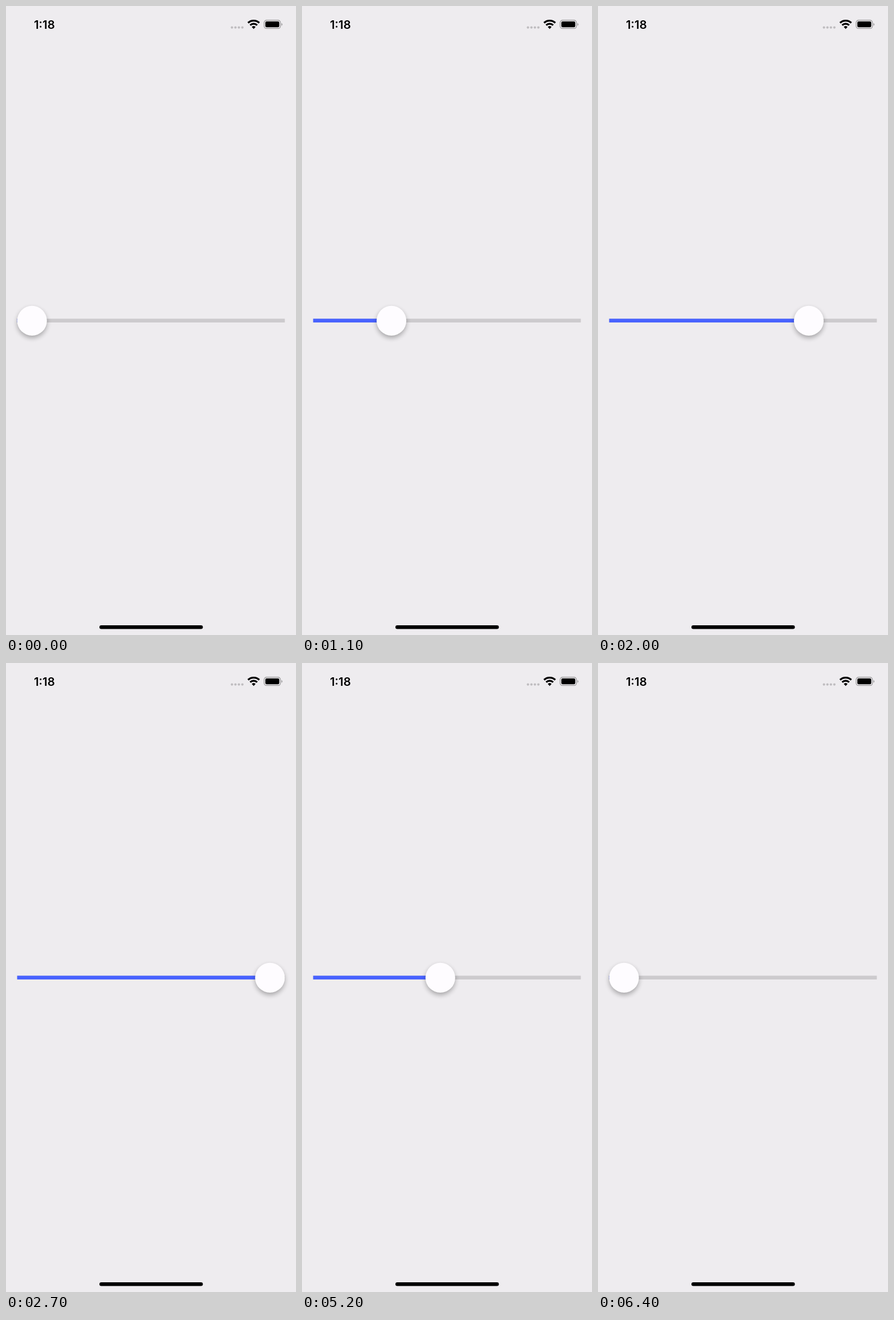
These frames come from a looping animation (509x1101 px, 6.6 s). An HTML page:

```html
<!DOCTYPE html>
<html lang="en">
<head>
<meta charset="utf-8">
<title>Slider</title>
<style>
  html, body { margin: 0; width: 100%; height: 100%; overflow: hidden; background: #eeecef; }
  svg { display: block; }
</style>
</head>
<body>
<svg width="509" height="1101" viewBox="0 0 509 1101">
  <defs>
    <filter id="blur" x="-50%" y="-50%" width="200%" height="200%">
      <feGaussianBlur stdDeviation="4.5"/>
    </filter>
  </defs>
  <rect width="509" height="1101" fill="#eeecef"/>

  <text x="67.4" y="39.8" text-anchor="middle" font-family="Inter, Roboto, sans-serif"
        font-size="20.4" font-weight="600">1:18</text>

  <g fill="#bfbdc0">
    <circle cx="396.6" cy="37.6" r="2.1"/>
    <circle cx="402.7" cy="37.6" r="2.1"/>
    <circle cx="408.8" cy="37.6" r="2.1"/>
    <circle cx="414.9" cy="37.6" r="2.1"/>
  </g>

  <g id="wifi" fill="none" stroke="#000" stroke-width="3.3"></g>

  <rect x="453.1" y="25" width="28.6" height="14.4" rx="4.2" fill="none" stroke="#9a999b" stroke-width="1.3"/>
  <rect x="455.2" y="27.1" width="24.4" height="10.2" rx="2.3"/>
  <path d="M483.5 29.8 a2.6 2.6 0 0 1 0 4.8 z" fill="#9a999b"/>

  <rect x="19.6" y="547.4" width="469.8" height="6.5" fill="#cccacd"/>
  <rect id="fill" x="19.6" y="547.4" height="6.5" fill="#4862ff"/>
  <g id="thumb">
    <circle cy="4" r="26" opacity=".3" filter="url(#blur)"/>
    <circle r="26.1" fill="#fefcff"/>
  </g>

  <rect x="164" y="1084" width="181.5" height="6.6" rx="3.3"/>
</svg>
<script>
const LOOP = 6600, STEP = 100, LEFT = 19.6, MIN = 45.7, MAX = 463.3;
const get = id => document.getElementById(id);

// Drag paths: [time in ms, thumb centre]
const forward = [[300, MIN], [400, 48], [1000, 122], [1100, 157], [1700, 317],
                 [2000, 370], [2400, 428], [2700, MAX]];
const back = [[4300, MAX], [4400, 452.8], [5000, 306], [5200, 242.8],
              [5700, 128], [6400, MIN]];

// Monotone cubic interpolation through the points
function curve(pts) {
  const n = pts.length - 1;
  const d = pts.slice(1).map((p, i) => (p[1] - pts[i][1]) / (p[0] - pts[i][0]));
  const m = pts.map((_, i) => {
    if (i === 0) return d[0];
    if (i === n) return d[n - 1] * 0.6;
    return 2 * d[i - 1] * d[i] / (d[i - 1] + d[i]);
  });
  return t => {
    if (t <= pts[0][0]) return pts[0][1];
    if (t >= pts[n][0]) return pts[n][1];
    const i = pts.findIndex(p => p[0] > t) - 1;
    const [t0, a] = pts[i], [t1, b] = pts[i + 1];
    const h = t1 - t0, s = (t - t0) / h, r = 1 - s;
    return a * (1 + 2 * s) * r * r + b * s * s * (3 - 2 * s)
         + h * s * r * (m[i] * r - m[i + 1] * s);
  };
}

const goRight = curve(forward), goLeft = curve(back);

function drawWifi() {
  const cx = 434.7, cy = 40.2, dx = 0.68, dy = 0.733;
  const arc = r => `${cx - r * dx} ${cy - r * dy} A${r} ${r} 0 0 1 ${cx + r * dx} ${cy - r * dy}`;
  get("wifi").innerHTML =
    `<path d="M${arc(14.5)}"/><path d="M${arc(9)}"/>` +
    `<path d="M${cx} ${cy} L${arc(5)} Z" fill="#000" stroke="none"/>`;
}

function draw(time) {
  const t = Math.floor((time % LOOP) / STEP) * STEP;
  const x = t < 3500 ? goRight(t) : goLeft(t);
  get("fill").setAttribute("width", Math.max(0, x - LEFT));
  get("thumb").setAttribute("transform", `translate(${x.toFixed(2)} 550.9)`);
}

function tick() {
  draw(performance.now());
  requestAnimationFrame(tick);
}

drawWifi();
tick();
</script>
</body>
</html>
```
